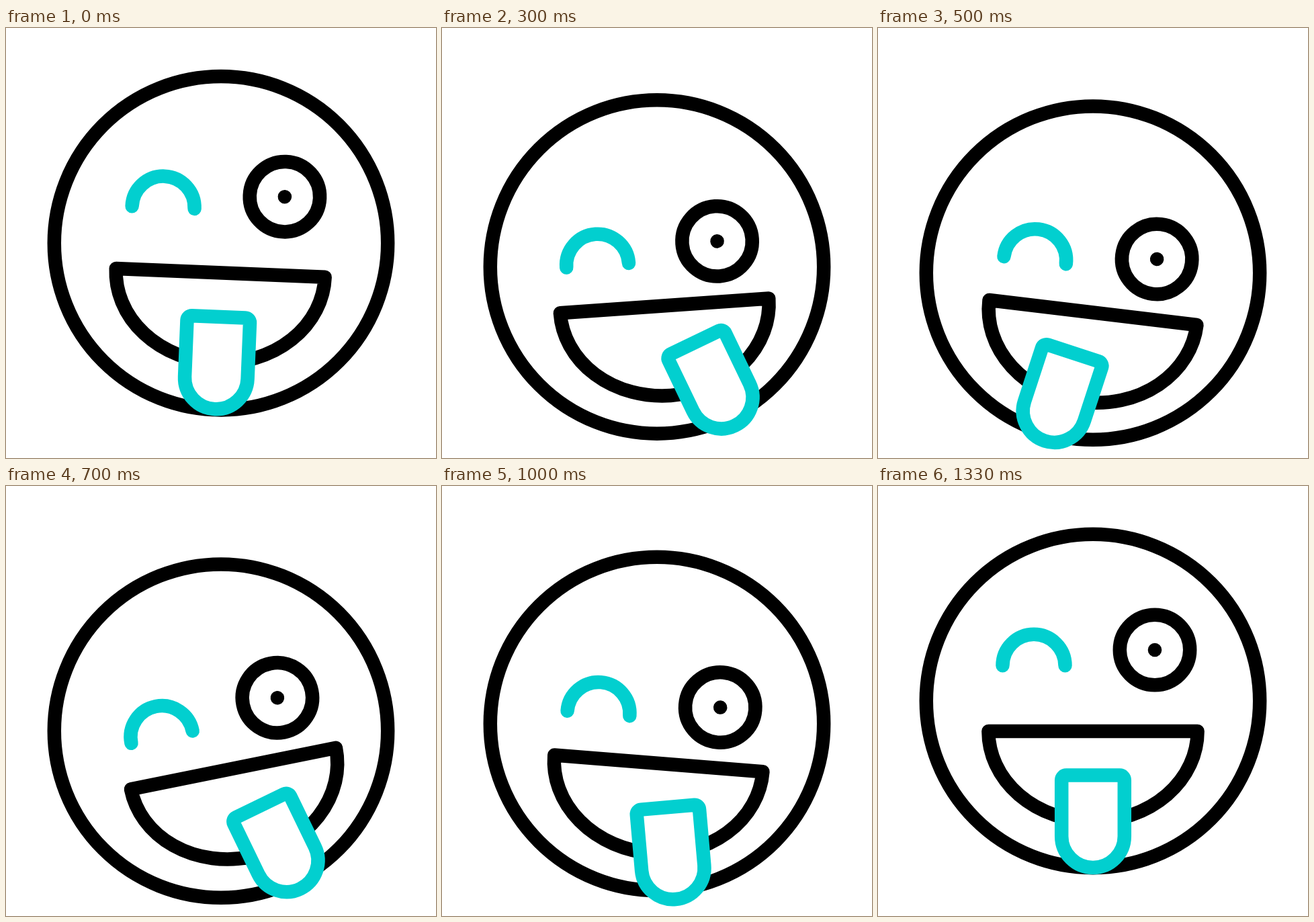
An HTML page with a canvas that plays this animation: 640x640 px, repeating every 1670 ms.

```html
<!DOCTYPE html>
<html lang="en">
<head>
<meta charset="utf-8">
<title>Winking face</title>
<style>
  html, body { margin: 0; width: 100%; height: 100%; overflow: hidden; background: #fff; }
  canvas { display: block; width: 100vmin; height: 100vmin; }
</style>
</head>
<body>
<canvas id="stage" width="640" height="640"></canvas>
<script>
const ctx = document.getElementById('stage').getContext('2d');
const LOOP = 1670, FPS = 30, LAST_STEP = 40;
const BLACK = '#000', TEAL = '#02cfcf';

// Keys are [step, value] pairs.
const HEAD_TILT = [[0, 0], [4, 15], [7.5, -15], [13.6, 15], [20.6, -15], [27, 14.4], [33.4, 0]];
const TONGUE_SWING = [[1, 0], [9, -25], [14.5, 13], [26.5, -27.2], [34, 0]];
const FACE_DROP = [[0, 0], [15, 44.6], [26, 44.6], [40, 0]];
const FEATURE_SHIFT = [[0, 0], [6.2, 1], [31, 1], [40.5, 0]];

const smooth = u => u * u * (3 - 2 * u);

// cubic-bezier(.5, 0, .5, 1)
function steep(u) {
  let lo = 0, hi = 1;
  for (let i = 0; i < 24; i++) {
    const t = (lo + hi) / 2;
    if (1.5 * t * (1 - t) + t ** 3 < u) lo = t; else hi = t;
  }
  return smooth(lo);
}

function track(keys, step, ease = smooth) {
  if (step <= keys[0][0]) return keys[0][1];
  for (let i = 1; i < keys.length; i++) {
    const [start, from] = keys[i - 1], [end, to] = keys[i];
    if (step < end) return from + (to - from) * ease((step - start) / (end - start));
  }
  return keys[keys.length - 1][1];
}

function rotateAbout(x, y, degrees) {
  ctx.translate(x, y);
  ctx.rotate(degrees * Math.PI / 180);
  ctx.translate(-x, -y);
}

function stroke(color, build) {
  ctx.beginPath();
  build();
  ctx.strokeStyle = color;
  ctx.stroke();
}

function circle(x, y, r) {
  stroke(BLACK, () => ctx.arc(x, y, r, 0, 2 * Math.PI));
}

function drawEyes() {
  stroke(TEAL, () => ctx.arc(232, 267.3, 46.5, Math.PI, 0));
  circle(412, 244, 52.2);
  ctx.beginPath();
  ctx.arc(412, 244, 10.3, 0, 2 * Math.PI);
  ctx.fillStyle = BLACK;
  ctx.fill();
}

function drawMouth() {
  stroke(BLACK, () => {
    ctx.ellipse(320, 365, 155.6, 134, 0, 0, Math.PI);
    ctx.closePath();
  });
}

function drawTongue() {
  stroke(TEAL, () => {
    ctx.arc(320, 521.2, 46.8, 0, Math.PI);
    ctx.arcTo(273.2, 430.6, 320, 430.6, 7);
    ctx.arcTo(366.8, 430.6, 366.8, 521, 7);
    ctx.closePath();
    ctx.fillStyle = '#fff';
    ctx.fill();
  });
}

function draw(time) {
  const frame = Math.min(LAST_STEP, Math.floor((time % LOOP + 5) * FPS / 1000));
  const step = frame + 1;
  const shift = track(FEATURE_SHIFT, step);

  // The mouth leaves and returns along differently bent paths.
  const [bendX, bendY] = step < 20 ? [7.6, -7.4] : [3.1, 11.3];
  const along = (bend, end) => 2 * shift * (1 - shift) * bend + shift * shift * end;

  ctx.setTransform(1, 0, 0, 1, 0, 0);
  ctx.fillStyle = '#fff';
  ctx.fillRect(0, 0, 640, 640);
  ctx.lineWidth = 20.5;
  ctx.lineCap = ctx.lineJoin = 'round';

  ctx.translate(0, track(FACE_DROP, step, steep));
  circle(320, 320, 248.2);
  rotateAbout(320, 320, track(HEAD_TILT, step));

  ctx.save();
  ctx.translate(0, 44.2 * shift);
  drawEyes();
  ctx.restore();

  ctx.translate(along(bendX, 7), along(bendY, 13.5));
  drawMouth();
  rotateAbout(320, 318.7, track(TONGUE_SWING, step));
  drawTongue();
}

const begin = performance.now();
function tick() {
  draw(performance.now() - begin);
  requestAnimationFrame(tick);
}
tick();
</script>
</body>
</html>
```
